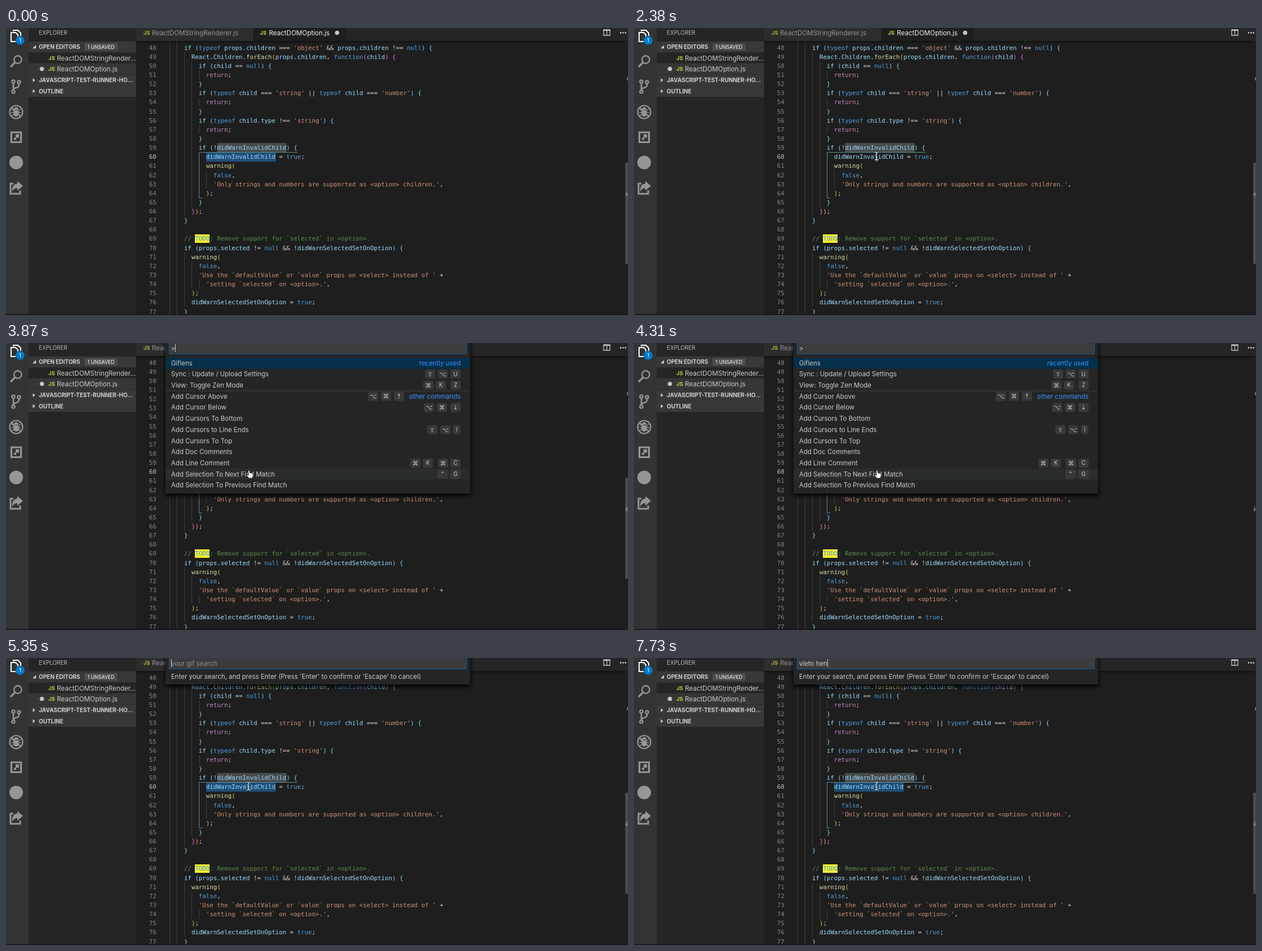
An HTML page with a canvas for the animation above (8000 ms loop, 1100 by 509 pixels).

```html
<!DOCTYPE html>
<html lang="en">
<head>
<meta charset="utf-8">
<title>Editor</title>
<style>
  html, body { margin: 0; width: 100%; height: 100%; overflow: hidden; background: #1e1e1e; }
  canvas { display: block; }
</style>
</head>
<body>
<canvas id="stage" width="1100" height="509"></canvas>
<script>
const ctx = document.getElementById('stage').getContext('2d');
const LOOP = 8000;
const UI = 'Inter, "Open Sans", sans-serif';
const MONO = '"DejaVu Sans Mono", monospace';
const SYMBOL = '"DejaVu Sans", sans-serif';
const BODY = 11.45, FILE = 11.6;
const CHAR = 6.457, LEFT = 289.2, ROW = 16.135, FIRST = 47;

const code = [
  '    // if children contains a non-element object. We should try to avoid that.',
  "    if (typeof props.children === 'object' && props.children !== null) {",
  '      React.Children.forEach(props.children, function(child) {',
  '        if (child == null) {',
  '          return;',
  '        }',
  "        if (typeof child === 'string' || typeof child === 'number') {",
  '          return;',
  '        }',
  "        if (typeof child.type !== 'string') {",
  '          return;',
  '        }',
  '        if (!didWarnInvalidChild) {',
  '          didWarnInvalidChild = true;',
  '          warning(',
  '            false,',
  "            'Only strings and numbers are supported as <option> children.',",
  '          );',
  '        }',
  '      });',
  '    }',
  '',
  '    // TODO: Remove support for `selected` in <option>.',
  '    if (props.selected != null && !didWarnSelectedSetOnOption) {',
  '      warning(',
  '        false,',
  "        'Use the `defaultValue` or `value` props on <select> instead of ' +",
  "          'setting `selected` on <option>.',",
  '      );',
  '      didWarnSelectedSetOnOption = true;',
  '    }'
];

const commands = [
  ['Giflens'],
  ['Sync : Update / Upload Settings', '⇧', 750, '⌥', 772.5, 'U', 795],
  ['View: Toggle Zen Mode', '⌘', 747, 'K', 769, 'Z', 795],
  ['Add Cursor Above', '⌥', 649, '⌘', 672, '↑', 695],
  ['Add Cursor Below', '⌥', 748, '⌘', 771, '↓', 795],
  ['Add Cursors To Bottom'],
  ['Add Cursors to Line Ends', '⇧', 754, '⌥', 777, 'I', 797],
  ['Add Cursors To Top'],
  ['Add Doc Comments'],
  ['Add Line Comment', '⌘', 724, 'K', 746, '⌘', 773, 'C', 795],
  ['Add Selection To Next Find Match', '⌃', 772, 'G', 795],
  ['Add Selection To Previous Find Match']
];

// Each step holds until the next: time, then values
const pointer = [
  [0, 'none', 0, 0],
  [740, 'arrow', 651, 497], [890, 'arrow', 629, 468], [1040, 'arrow', 599, 428],
  [1190, 'arrow', 564, 380], [1340, 'arrow', 530, 335], [1490, 'arrow', 503, 304],
  [1640, 'arrow', 483, 282], [1930, 'beam', 445, 246], [2080, 'beam', 432, 232],
  [2380, 'beam', 429, 227], [3870, 'hand', 431, 233], [5200, 'beam', 429, 227]
];
const editorCaret = [[0, 0], [2380, 429], [2520, 477], [3120, 0], [3570, 477], [3870, 0]];
const inputCaret = [[0, false], [3870, true], [4310, false], [4900, true], [5800, false], [6400, true]];
const typed = [[0, ''], [6550, 'v'], [6850, 'vl'], [6990, 'vlet'], [7290, 'vleto '], [7580, 'vleto h'], [7730, 'vleto hen']];

const at = (steps, t) => steps.filter(s => s[0] <= t).pop();

function rect(x, y, w, h, color) {
  ctx.fillStyle = color;
  ctx.fillRect(x, y, w, h);
}

function text(s, x, y, color, size = BODY, font = UI, weight = 400, align = 'left') {
  ctx.font = `${weight} ${size}px ${font}`;
  ctx.textAlign = align;
  ctx.fillStyle = color;
  ctx.fillText(s, x, y + size * 0.365);
}

function disc(x, y, r, color) {
  ctx.fillStyle = color;
  ctx.beginPath();
  ctx.arc(x, y, r, 0, 7);
  ctx.fill();
}

function box(x, y, w, h, r, color) {
  ctx.fillStyle = color;
  ctx.beginPath();
  ctx.roundRect(x, y, w, h, r);
  ctx.fill();
}

function stroke(d, color, width) {
  ctx.strokeStyle = color;
  ctx.lineWidth = width;
  ctx.stroke(new Path2D(d));
}

function fill(d, color) {
  ctx.fillStyle = color;
  ctx.fill(new Path2D(d));
}

function moved(x, y, draw) {
  ctx.save();
  ctx.translate(x, y);
  draw();
  ctx.restore();
}

const lineY = n => 34.7 + (n - 48) * ROW;
const colX = c => LEFT + c * CHAR;

const TOKEN = /\/\/.*|'[^']*'|\w+|[(){}]|[^\s\w(){}']+/g;
const PAIRS = ['#e9c62e', '#da70d6', '#87cefa'];

function tokenColor(word, next) {
  if (word.startsWith('//')) return '#608b4e';
  if (word[0] === "'") return '#ce9178';
  if (word === 'if') return '#9cdcfe';
  if (word === 'return') return '#c586c0';
  if (/^(typeof|function|null|true|false)$/.test(word)) return '#569cd6';
  if (/^\w/.test(word)) return next === '(' ? '#dcdcaa' : '#9cdcfe';
  return '#d4d4d4';
}

function guides() {
  rect(289, 23, 1, 486, '#404040');
  rect(302, 23, 1, 486, '#404040');
  code.forEach((line, i) => {
    const indent = line.search(/\S/);
    for (let c = 4; c < indent; c += 2)
      rect(Math.round(colX(c)), lineY(i + FIRST) - ROW / 2, 1, ROW, '#404040');
  });
}

function editor(t) {
  rect(230, 0, 870, 509, '#1e1e1e');
  guides();
  rect(373, 204, 123, 16, '#484b4d');
  if (t < 2380 || t >= 2520) rect(354, 221, 123, 16, '#1f4f78');
  stroke('M515 220.5H341.5V301.5H347', '#5f8f96', 1);
  rect(334, 366, 26, 15, '#fcf22c');

  let depth = 2;
  code.forEach((line, i) => {
    const n = i + FIRST, y = lineY(n);
    const put = (s, c, color) => text(s, colX(c), y, color, 10.725, MONO);
    text(n, 266, y, n === 60 ? '#c6c6c6' : '#858585', 10.725, MONO, 400, 'right');
    for (const m of line.matchAll(TOKEN)) {
      const word = m[0], col = m.index;
      let color = tokenColor(word, line[col + word.length]);
      if (/^[({]$/.test(word)) color = PAIRS[depth++ % 3];
      if (/^[)}]$/.test(word)) color = PAIRS[--depth % 3];
      if (word.startsWith('// TODO')) {
        put('//', col, color);
        put('TODO', col + 3, '#3f8fd0');
        put(word.slice(7), col + 7, color);
      } else put(word, col, color);
    }
  });

  const caret = at(editorCaret, t)[1];
  if (caret) rect(caret - 0.5, 220, 1.5, 17, '#c8c8c8');

  if (t < 4310 || t >= 5350) rect(1095, 239, 5, 179, '#4b4b4b');
  rect(1095, 294, 5, 1.5, '#8c8c8c');
  rect(1097, 290, 1, 9, '#8c8c8c');
  rect(1098.5, 87, 1.5, 6, '#8c8c8c');
}

function tabs() {
  const shade = ctx.createLinearGradient(0, 23, 0, 28);
  shade.addColorStop(0, 'rgba(0,0,0,.45)');
  shade.addColorStop(1, 'rgba(0,0,0,0)');
  rect(230, 23, 866, 5, shade);
  rect(230, 0, 870, 23, '#252526');
  rect(230, 0, 207, 23, '#2d2d2d');
  rect(437, 0, 164, 23, '#1e1e1e');
  text('JS', 243, 8.5, '#b0b03c', 9.3, UI, 700);
  text('ReactDOMStringRenderer.js', 258, 8.5, '#929292', FILE);
  text('JS', 449, 8.5, '#cbcb41', 9.3, UI, 700);
  text('ReactDOMOption.js', 465, 8.5, '#f0f0f0', FILE);
  disc(585.5, 8.5, 3.8, '#c5c5c5');
  stroke('M1057 3.5H1068V13H1057ZM1062.5 3V13', '#c5c5c5', 1.3);
  rect(1056.5, 2.5, 12, 2.5, '#c5c5c5');
  for (let x = 1087; x < 1097; x += 4.3) disc(x, 8.5, 1.4, '#c5c5c5');
}

function header(label, y, open) {
  rect(40, y - 9.5, 190, 19.5, '#383838');
  fill(open ? `M53 ${y - 3}V${y + 3}H47Z` : `M47.5 ${y - 3.5}L51.5 ${y}L47.5 ${y + 3.5}Z`, '#d0d0d0');
  text(label, 58, y, '#d0d0d0', 9.95, UI, 700);
}

function sidebar() {
  rect(40, 0, 190, 509, '#252526');
  text('EXPLORER', 58, 8.5, '#bbbbbb', 9.9);
  header('OPEN EDITORS', 33.3, true);
  box(139, 27, 58, 13, 1, '#4d4d4d');
  text('1 UNSAVED', 168, 33.5, '#ffffff', 8.7, UI, 400, 'center');
  rect(40, 62.5, 190, 20, '#363637');
  text('JS', 75, 53.4, '#cbcb41', 9.3, UI, 700);
  text('ReactDOMStringRender...', 90, 53.4, '#cccccc', FILE);
  disc(63.5, 72.5, 3.8, '#c5c5c5');
  text('JS', 75, 73, '#cbcb41', 9.3, UI, 700);
  text('ReactDOMOption.js', 90, 73, '#cccccc', FILE);
  header('JAVASCRIPT-TEST-RUNNER-HO...', 92.5);
  header('OUTLINE', 112);
}

function activityBar() {
  const c = '#969696';
  rect(0, 0, 40, 509, '#333333');
  stroke('M13 6V4H21L26 9V19H22M9 8H17L21 12V24H9Z', '#ffffff', 2);
  disc(25, 22, 8.3, '#333333');
  disc(25, 22, 7.8, '#007acc');
  text('1', 25, 22, '#ffffff', 9.5, UI, 400, 'center');

  stroke('M27.5 56A6.7 6.7 0 1 1 14.1 56A6.7 6.7 0 1 1 27.5 56', c, 2.4);
  stroke('M16 61L8 69', c, 3.2);

  stroke('M13 97V112M23 97V100Q23 105 18 106Q13 107 13 111', c, 2.6);
  for (const [x, y] of [[13, 95], [23, 96], [13, 113]]) {
    disc(x, y, 3.8, c);
    disc(x, y, 1.5, '#333333');
  }

  stroke('M29.5 149A11.5 11.5 0 1 1 6.5 149A11.5 11.5 0 1 1 29.5 149', c, 2.2);
  fill('M14 145Q14 140.5 18 140.5Q22 140.5 22 145ZM13.5 146H22.5V151Q22.5 157 18 157Q13.5 157 13.5 151Z', c);
  stroke('M10 144L14 147M9.5 150H14M10 156L14 153M26 144L22 147M26.5 150H22M26 156L22 153', c, 1.4);
  stroke('M10 141L26 157', c, 2);

  stroke('M9.5 185H26.5V202.5H9.5Z', c, 3.2);
  rect(17, 188.5, 6, 6, c);
  rect(14, 194.5, 4, 4, c);

  disc(18, 238.5, 12, c);

  stroke('M13 276H8V294H25V288', c, 3);
  fill('M20 271.5L30 280L20 288.5V284Q14 283.5 11 290.5Q10 277 20 276Z', c);
}

function panel(h) {
  ctx.save();
  ctx.shadowColor = '#000';
  ctx.shadowBlur = 8;
  ctx.shadowOffsetY = 4;
  rect(282, -10, 538.5, h + 10, '#252526');
  ctx.restore();
  rect(288, -2, 527, 22, '#3c3c3c');
  ctx.strokeStyle = '#0f5a8c';
  ctx.lineWidth = 1;
  ctx.strokeRect(288.5, -1.5, 526, 21);
}

function keyCap(label, x, y) {
  const w = label === 'I' ? 13 : 18;
  box(x - w / 2, y - 8, w, 16, 3, '#393939');
  const symbol = !/\w/.test(label);
  text(label, x, y, '#cccccc', symbol ? 10.5 : 9.8, symbol ? SYMBOL : UI, 400, 'center');
}

function palette(t) {
  const hover = t < 5200;
  panel(267);
  text('>', 292, 9.5, '#cccccc');
  rect(282, 26, 538.5, 19.5, '#062f4a');
  if (hover) rect(282, 222.5, 538.5, 19.7, '#2a2c2d');
  else rect(811, 26, 9, 17, '#33536a');
  rect(282, 84.5, 538.5, 1, '#3f3f46');
  commands.forEach(([label, ...keys], i) => {
    const y = 35.4 + i * 19.72;
    text(label, 292, y, '#cccccc');
    for (let k = 0; k < keys.length; k += 2) keyCap(keys[k], keys[k + 1], y);
  });
  text('recently used', 804, 35.4, '#3794ff', BODY, UI, 400, 'right');
  text('other commands', 804, 95.2, '#3794ff', BODY, UI, 400, 'right');
  if (at(inputCaret, t)[1]) rect(299, 2, 1, 14, '#d0d0d0');
}

function prompt(t) {
  panel(47);
  const query = at(typed, t)[1];
  text(query || 'your gif search', 292, 9.5, query ? '#cccccc' : '#8f8f8f');
  const end = 292 + (query ? ctx.measureText(query).width : 0);
  if (at(inputCaret, t)[1]) rect(Math.round(end), 2, 1, 14, '#d0d0d0');
  text("Enter your search, and press Enter (Press 'Enter' to confirm or 'Escape' to cancel)", 292, 33, '#cccccc');
}

const shapes = {
  none() {},
  arrow() {
    const d = 'M0 0V13L3 10.3L5 15L7.2 14L5.2 9.5H9.2Z';
    ctx.lineJoin = 'round';
    stroke(d, '#ffffff', 1.8);
    fill(d, '#111111');
  },
  beam() {
    const d = 'M-3.5 -7Q-.5 -7 0 -5Q.5 -7 3.5 -7M0 -5V5M-3.5 7Q-.5 7 0 5Q.5 7 3.5 7M-1.5 2H1.5';
    stroke(d, '#15202a', 2.6);
    stroke(d, '#f2f2f2', 1.2);
  },
  hand() {
    const d = 'M-2 -7Q-.8 -8 0 -6.5L.6 -2.5Q2 -3.5 2.7 -2.2Q4 -3 4.7 -1.6Q6.2 -2 6.3 0Q6.4 3 4.6 7H-1.8Q-3 4 -5.4 2Q-6 0 -4 .4L-2.4 1.5L-3 -5.5Z';
    fill(d, '#f4f4f4');
    stroke(d, '#111111', 1);
  }
};

function draw(t) {
  ctx.clearRect(0, 0, 1100, 509);
  editor(t);
  tabs();
  sidebar();
  activityBar();
  rect(0, 507.5, 1100, 1.5, '#151214');
  if (t >= 5350) prompt(t);
  else if (t >= 3870) palette(t);
  const [, kind, x, y] = at(pointer, t);
  moved(x, y, shapes[kind]);
}

const start = performance.now();
function tick() {
  draw((performance.now() - start) % LOOP);
  requestAnimationFrame(tick);
}
tick();
</script>
</body>
</html>
```
